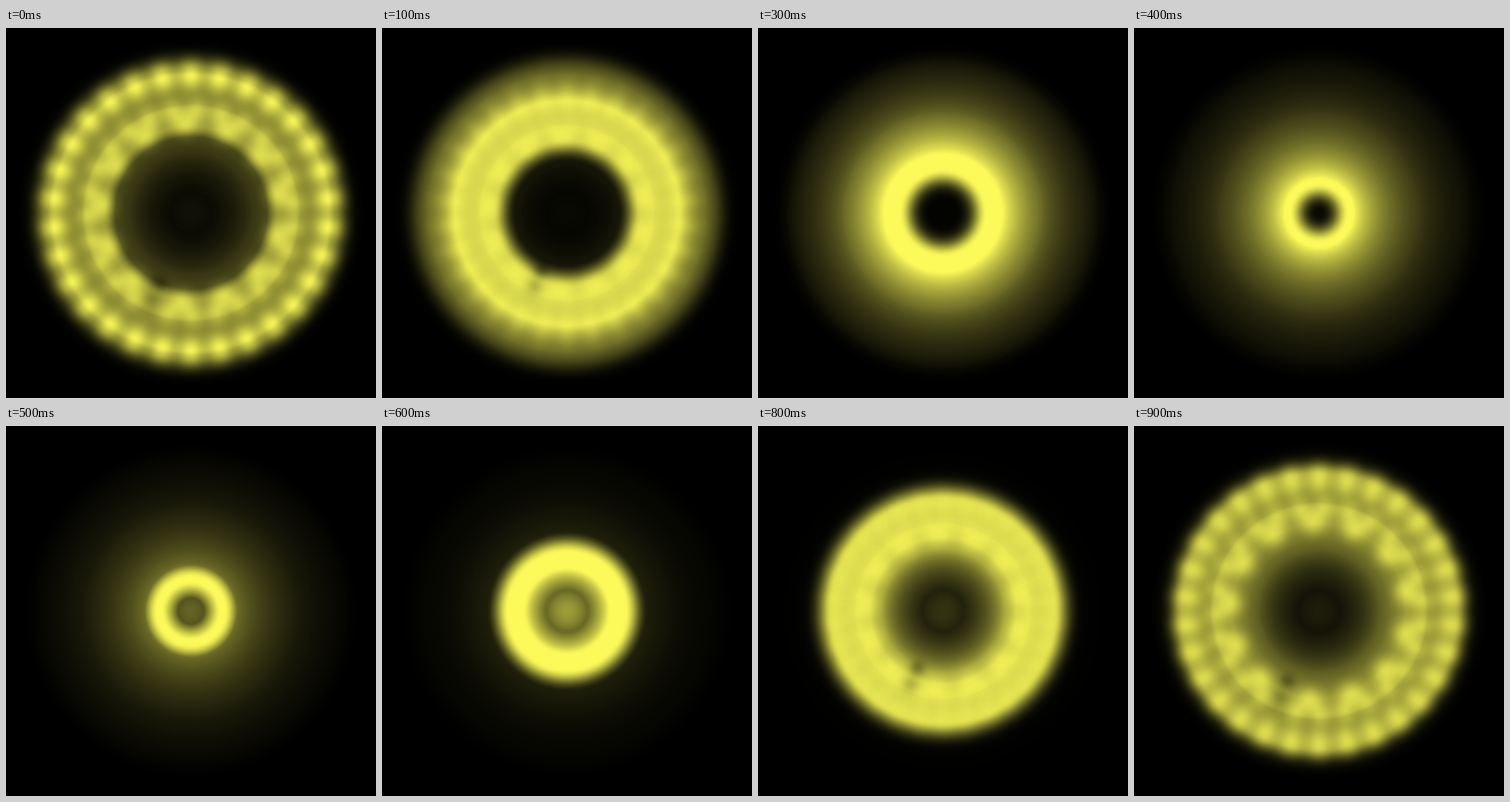
Write an HTML page with a canvas that moves like this. It is 400x400 px and loops after 1 s.

```html
<!DOCTYPE html>
<html>
<head>
<meta charset="utf-8">
<style>
html, body { margin: 0; height: 100%; overflow: hidden; background: #000; }
canvas { display: block; }
</style>
</head>
<body>
<canvas id="stage" width="400" height="400"></canvas>
<script>
const ctx = document.getElementById('stage').getContext('2d');
const LOOP = 1000, STEP = 100, SIZE = 400, MID = SIZE / 2;
const DECAY = 0.57, SUB = 10, HISTORY = 90, REACH = 200;
const RAD = Math.PI / 180;

const clamp = v => Math.max(0, Math.min(1, v));
const bell = (d, w) => Math.exp(-d * d / (2 * w * w));
const band = (r, from, to, w) => bell(Math.max(from - r, 0, r - to), w);
const fade = age => DECAY ** (age / STEP);
const glow = (v, a = 1) => `rgba(${252 * v},${250 * v},${90 * v},${a})`;

// Ring radii follow a softened triangle wave, widest at 950 ms
function pose(t) {
  const s = Math.asin(0.97 * Math.cos(2 * Math.PI * (t - 950) / LOOP));
  const inner = 64 + 27 * s, outer = 91.5 + 47.3 * s;
  const m = (t + LOOP) % LOOP;
  return {
    inner, outer,
    mid: inner + (outer - inner) * 0.32,
    innerAmp: Math.min(1, 0.62 + (96 - inner) * 0.014),
    outerAmp: Math.min(1, 0.77 + (147 - outer) * 0.004),
    valley: Math.min(1, 0.55 + (147 - outer) * 0.01),
    contrast: clamp((outer - 85) / 62) ** 2,
    core: 0.66 * Math.exp(-(((m - 575) / 105) ** 2))
  };
}

// Brightness at radius r; the dots' share of the outer ring blurs in with age
function level(p, r, age) {
  const outerAmp = p.outerAmp - 0.35 * p.contrast * clamp(1 - age / STEP);
  return Math.max(
    outerAmp * bell(r - p.outer, 11),
    p.innerAmp * band(r, p.inner, p.mid, 11),
    p.valley * band(r, p.inner, p.outer, 10),
    p.core * Math.exp(-((r / 35) ** 2))
  );
}

function drawGlow(t) {
  const past = Array.from({ length: HISTORY }, (_, k) => pose(t - k * SUB));
  const g = ctx.createRadialGradient(MID, MID, 0, MID, MID, REACH);
  for (let r = 0; r <= REACH; r += 2) {
    let v = 0;
    past.forEach((p, k) => {
      v = Math.max(v, level(p, r, k * SUB) * fade(k * SUB));
    });
    g.addColorStop(r / REACH, glow(v * clamp((REACH - r) / 25)));
  }
  ctx.fillStyle = g;
  ctx.fillRect(0, 0, SIZE, SIZE);
}

function spot(angle, radius, width, paint) {
  const x = MID + radius * Math.sin(angle * RAD);
  const y = MID - radius * Math.cos(angle * RAD);
  const reach = width * 2.6;
  const g = ctx.createRadialGradient(x, y, 0, x, y, reach);
  for (let i = 0; i <= 8; i++) {
    const f = bell(i / 8 * reach, width) * (1 - (i / 8) ** 4);
    g.addColorStop(i / 8, paint(f));
  }
  ctx.fillStyle = g;
  ctx.fillRect(x - reach, y - reach, reach * 2, reach * 2);
}

function drawOuterDots(p, amp) {
  for (let i = 0; i < 30; i++) {
    spot(i * 12, p.outer, 10, f => glow(1, amp * p.contrast * f));
  }
}

function drawDots(t) {
  const p = pose(t);
  const light = amp => f => glow(1, amp * p.contrast * f);

  ctx.globalCompositeOperation = 'lighter';
  drawOuterDots(p, 0.27);
  drawOuterDots(pose(t - STEP / 2), 0.25 * fade(STEP / 2));
  for (let i = 0; i < 13; i++) {
    const a = 186 - i * 27.1;
    spot(a, p.inner, 9.5, light(0.25));
    spot(a - 6.8, p.mid, 8.5, light(0.2));
    spot(a + 6.8, p.mid, 8.5, light(0.2));
  }
  ctx.globalCompositeOperation = 'source-over';

  // Seam where the inner ring does not quite close
  const seam = clamp((p.inner - 56) / 20);
  spot(204, p.inner - 13, 6, f => `rgba(0,0,0,${0.3 * seam * f})`);
  spot(204, p.inner + 6, 6, f => `rgba(0,0,0,${0.15 * seam * f})`);
}

let shown = -1;
function frame(now) {
  const step = Math.floor((now % LOOP) / STEP);
  if (step !== shown) {
    shown = step;
    drawGlow(step * STEP);
    drawDots(step * STEP);
  }
  requestAnimationFrame(frame);
}
frame(0);
</script>
</body>
</html>
```
